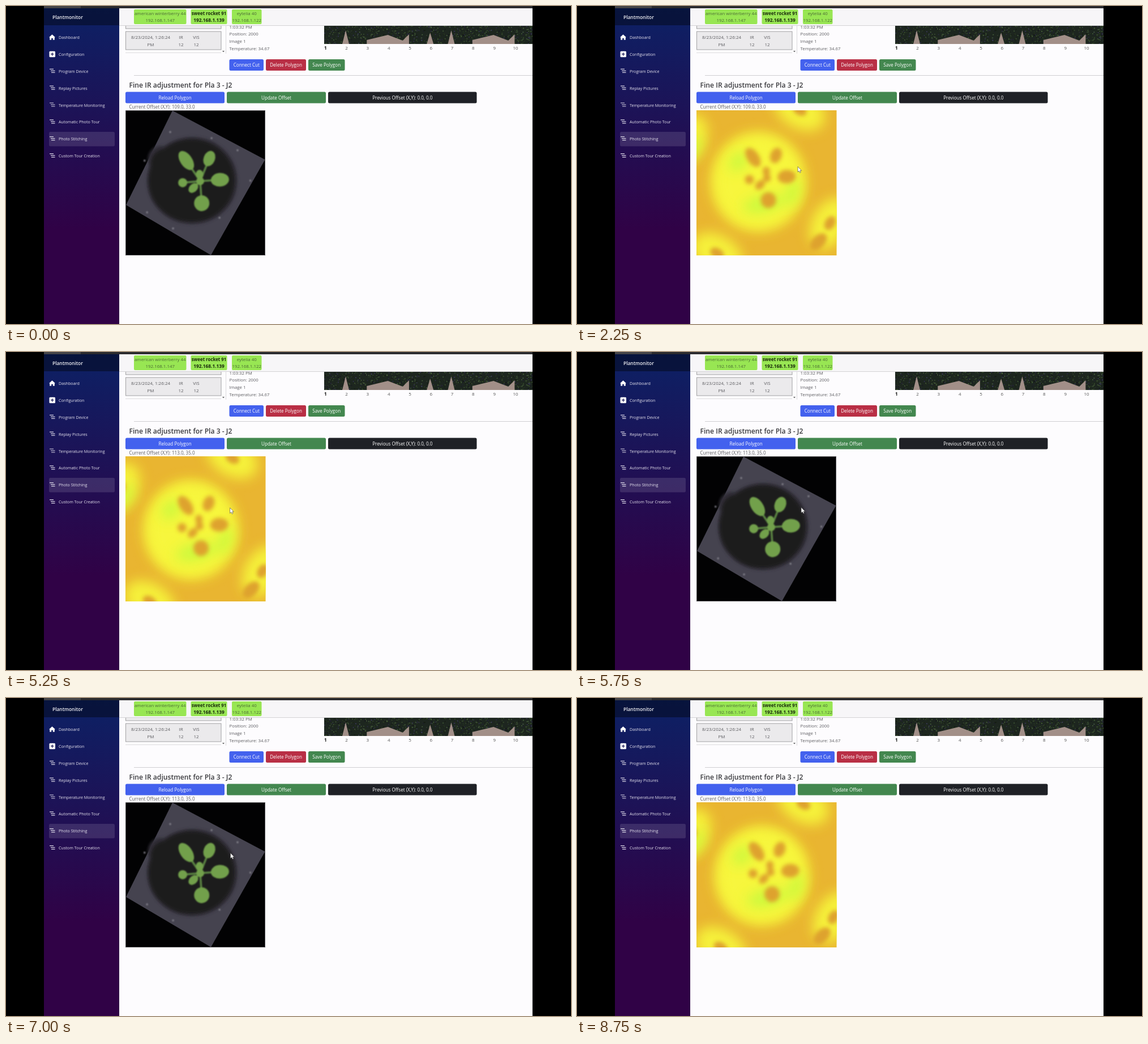
An HTML page that plays this animation: 998 px wide and 561 px high, repeating every 9.25 s.

```html
<!DOCTYPE html>
<html lang="en">
<head>
<meta charset="utf-8">
<title>Plantmonitor</title>
<style>
  html, body { margin: 0; width: 100%; height: 100%; overflow: hidden; background: #000; }
  svg { display: block; width: 998px; height: 561px; font: 8px "Open Sans", "Noto Sans", sans-serif; }
</style>
</head>
<body>
<svg id="stage" viewBox="0 0 998 561">
  <defs>
    <linearGradient id="side" x2="0" y2="1">
      <stop stop-color="#0c2165"/><stop offset=".7" stop-color="#300246"/>
    </linearGradient>
    <clipPath id="strip"><rect x="562" y="34" width="368" height="33"/></clipPath>
    <clipPath id="photo"><rect x="211" y="184" width="247.500" height="256"/></clipPath>
    <filter id="soft"><feGaussianBlur stdDeviation="0.8"/></filter>
    <filter id="rough"><feGaussianBlur stdDeviation="2.5"/></filter>
    <filter id="warm" x="-30%" y="-30%" width="160%" height="160%"><feGaussianBlur stdDeviation="3.8"/></filter>
    <filter id="heat" x="-40%" y="-40%" width="180%" height="180%"><feGaussianBlur stdDeviation="11"/></filter>
  </defs>
</svg>
<script>
const stage = document.getElementById('stage');
const GREY = '#5c5c60';

const rect = (x, y, w, h, fill, r = 0, extra = '') =>
  `<rect x="${x}" y="${y}" width="${w}" height="${h}" rx="${r}" fill="${fill}" ${extra}/>`;
const text = (x, y, str, fill, size = 8, anchor = 'start', weight = 400, id = '') =>
  `<text id="${id}" x="${x}" y="${y}" fill="${fill}" font-size="${size}" text-anchor="${anchor}" font-weight="${weight}">${str}</text>`;
const path = (d, fill, extra = '') => `<path d="${d}" fill="${fill}" ${extra}/>`;
const blur = (shapes, fill, filter) => `<g fill="${fill}" filter="url(#${filter})">${shapes}</g>`;
const button = (x, y, w, fill, label) =>
  rect(x, y, w, 20, fill, 2.5) + text(x + w / 2, y + 13, label, '#fff', 8.1, 'middle');
const repeat = (n, part) => Array.from({ length: n }, (_, i) => part(i)).join('');

// ellipse at a distance and angle from a centre, its long axis pointing outwards
const petal = (x, y, angle, dist, rx, ry = rx) =>
  `<ellipse cx="${dist}" rx="${rx}" ry="${ry}" transform="translate(${x} ${y}) rotate(${angle})"/>`;

function random(seed) {
  return () => (seed = seed * 16807 % 2147483647) / 2147483647;
}

function sidebar() {
  const items = ['Dashboard', 'Configuration', 'Program Device', 'Replay Pictures', 'Temperature Monitoring',
    'Automatic Photo Tour', 'Photo Stitching', 'Custom Tour Creation'];
  const house = y => path(`M76 ${y}l5.500-5 5.500 5h-1.200v4.500h-3v-3h-2.600v3h-3V${y}z`, '#fff');
  const plus = y => rect(76.5, y - 5.5, 10.5, 10.5, '#fff', 1.5) +
    path(`M79 ${y - .2}h5.500M81.750 ${y - 3}v5.500`, 'none', 'stroke="#20205c" stroke-width="1.300"');
  const list = y => path(`M77 ${y - 3.7}h7m-5 3h7.500m-6.500 3h6.500`, 'none', 'stroke="#d8d4e4" stroke-width="1.200"');
  return rect(67, 4, 133, 557, 'url(#side)') + rect(67, 4, 133, 30, 'rgba(0,0,0,.4)') +
    text(82, 22.7, 'Plantmonitor', '#f2f2f6', 8.4, 'start', 600) +
    rect(76, 222, 116, 25.5, 'rgba(255,255,255,.12)', 2.5) +
    items.map((name, i) => {
      const y = 55.3 + i * 29.85;
      return ([house, plus][i] || list)(y) + text(93, y + 2.8, name, '#e6e3ee', 7.15);
    }).join('');
}

function plantStrip() {
  const rnd = random(41), step = 37.3;
  const speckle = repeat(900, () => rect(562 + rnd() * 368, 34 + rnd() * 33, 2, 1.8,
    `hsl(${rnd() < .75 ? 100 : 245} 24% ${8 + rnd() * 24}%)`, 0.8));
  const wedge = (x, h) => `M${x - 6} 67L${x} ${67 - h} ${x + 6} 67z`;
  // the seams repeat every five tiles
  const seams = repeat(2, i => {
    const x = 600 + i * step * 5;
    return wedge(x, 24) + wedge(x + 4 * step, 20) +
      `M${x + step} 67V60L${x + 2 * step} 51 ${x + 2.7 * step} 61 ${x + 3 * step} 50V67z`;
  });
  const label = i => text(564.3 + i * step, 77, i + 1, i ? '#555' : '#111', 8, 'middle', i ? 400 : 700);
  return `<g clip-path="url(#strip)">${rect(562, 34, 368, 33, '#1d261f') + speckle + path(seams, '#a28f88')}</g>` +
    repeat(10, label);
}

function history() {
  const row = (y, lines) => rect(211.5, y, 168.5, 32, '#ebeaec', 0, 'stroke="#a2a2a4"') +
    lines.map((cells, i) => cells.map((s, k) =>
      text([255.5, 309, 336][k], y + 13 + i * 12.5, s, GREY, 8, 'middle')).join('')).join('');
  return row(8, [[], ['PM', '12', '12']]) +
    row(45, [['8/23/2024, 1:26:24', 'IR', 'VIS'], ['PM', '12', '12']]) +
    path('M211 82.500H380M388.500 34V84', 'none', 'stroke="#dcdbdd"') + path('M382 79h4l-2 2.500z', '#666');
}

function page() {
  return rect(200, 4, 730, 557, '#fdfcfe') + history() + plantStrip() +
    ['1:03:32 PM', 'Position: 2000', 'Image 1', 'Temperature: 34.67']
      .map((s, i) => text(394.5, 39.6 + i * 12.7, s, GREY, 7.8)).join('') +
    button(394.5, 94, 60.5, '#4361ee', 'Connect Cut') +
    button(459, 94, 71, '#b92f45', 'Delete Polygon') +
    button(534, 94, 64.5, '#43874f', 'Save Polygon') +
    rect(226, 122, 704, 1, '#cfced1') +
    text(217.5, 144.3, 'Fine IR adjustment for Pla 3 - J2', '#3a3a3e', 12.15, 'start', 600) +
    button(211, 151.5, 175, '#4361ee', 'Reload Polygon') +
    button(390, 151.5, 175, '#43874f', 'Update Offset') +
    button(569, 151.5, 262.5, '#1f2126', 'Previous Offset (X,Y): 0.0, 0.0') +
    text(217.5, 181, '', GREY, 8.05, 'start', 400, 'offset');
}

function header() {
  const tag = (x, w, name, address, weight, fill) =>
    rect(x, 6, w, 26, '#98e653', 2) +
    text(x + w / 2, 16, name, fill, 7.9, 'middle', weight) +
    text(x + w / 2, 28.4, address, fill, weight > 400 ? 8.3 : 7.9, 'middle', weight);
  return rect(67, 0, 863, 4, '#2b2b2e') + rect(67, 0, 65, 4, '#444447') +
    rect(200, 4, 730, 30, '#f7f6f8') + rect(200, 34, 730, 1, '#d3d2d5') +
    tag(226, 92.5, 'american winterberry 44', '192.168.1.147', 400, '#4b6a35') +
    tag(326.5, 64, 'sweet rocket 91', '192.168.1.139', 700, '#1a2b0c') +
    tag(399, 52.5, 'eytelia 40', '192.168.1.122', 400, '#4b6a35');
}

// leaf: angle, distance, half length, half width
const leaves = [[-124, 44, 19, 10.5], [-68, 43, 14, 10], [-4, 35, 16, 12], [175, 31, 8, 8],
  [86, 39, 14, 13.5], [135, 17, 10, 7], [-95, 12, 8, 6.5]];
const plant = (x, y) => leaves.map(leaf => petal(x, y, ...leaf)).join('') + petal(x, y, 0, 0, 7);

function visiblePhoto() {
  const x = 343, y = 309, rnd = random(7);
  const stems = leaves.map(([angle, dist]) =>
    `<path d="M0 0H${dist}" stroke="#5b8543" stroke-width="3.500" transform="translate(${x} ${y}) rotate(${angle})"/>`).join('');
  const specks = repeat(8, i => petal(329, 308, 45 * i + 30 * rnd(), 75 + 30 * rnd(), 1.7));
  return rect(211, 184, 247, 256, '#020203') +
    path('M294 184.500L457.500 271 362 439.500 212 351z', '#45434f') +
    blur(petal(329, 308, 0, 0, 80, 77) + petal(329, 308, 215, 66, 24), '#302f37', 'rough') +
    blur(petal(328, 308, 0, 0, 76, 73) + petal(328, 308, 213, 55, 26), '#1b1b1d', 'rough') +
    blur(specks, '#85848d', 'soft') +
    blur(stems + plant(x, y), '#72a04c', 'soft') +
    rect(211.5, 184.5, 246, 255, 'none', 0, 'stroke="#77767a" stroke-width=".7"');
}

function heatPhoto() {
  const x = 322, y = 310;
  // neighbouring pots sit on a tilted square grid around the middle one
  const around = (dist, rx, ry) => repeat(4, k => petal(x, y, 30 + 90 * k, dist, rx, ry));
  return rect(180, 150, 310, 320, '#e9b531') +
    blur(petal(x, y, 0, 0, 84, 88) + around(146, 32, 48), '#f5f13a', 'heat') +
    blur(petal(x, y, 0, 0, 72, 75), '#f7f63c', 'heat') +
    blur(petal(x, y, 78, 40, 14, 36) + petal(x, y, 18, 63, 11, 25) + petal(x, y, 225, 50, 13, 19) +
      petal(x, y, 207, 128, 8, 24), '#c8f93d', 'heat') +
    blur(plant(x + 15, y - 6.5) + around(146, 9, 13) + petal(x, y, 45, 150, 11, 18), '#dea22d', 'warm');
}

stage.innerHTML += page() + sidebar() + header() +
  `<g clip-path="url(#photo)"><g id="visible">${visiblePhoto()}</g><g id="heatmap">${heatPhoto()}</g></g>` +
  path('M0 0V9.500L2.200 7.600 3.700 10.800 5.300 10 3.900 7H6.700z', '#fff', 'id="cursor" stroke="#444" stroke-width=".6"');

const [offset, visible, heatmap, cursor] =
  ['offset', 'visible', 'heatmap', 'cursor'].map(id => document.getElementById(id));

const progress = (t, from, to) => Math.min(1, Math.max(0, (t - from) / (to - from)));
const easeOut = k => 1 - (1 - k) ** 2;

// enter, drift while adjusting, then leave downwards
function pointerAt(t) {
  const enter = 1 - easeOut(progress(t, 500, 1250));
  const drift = easeOut(progress(t, 1250, 7000));
  const leave = progress(t, 7000, 7500);
  return [387 + 40 * enter + 9.5 * drift + 6 * leave, 288 + 55 * enter - 14.5 * drift + 180 * leave];
}

function draw() {
  const t = Math.floor(performance.now() % 9250 / 250) * 250;
  const adjust = progress(t, 2750, 5000);
  const x = 109 + Math.floor(4 * adjust), y = 33 + Math.floor(2 * adjust);
  const heatOn = (t >= 2000 && t < 5750) || t >= 7500;
  offset.textContent = `Current Offset (X,Y): ${x}.0, ${y}.0`;
  visible.style.display = heatOn ? 'none' : '';
  heatmap.style.display = heatOn ? '' : 'none';
  heatmap.setAttribute('transform', `translate(${(x - 110) * 1.6} ${(y - 33) * 1.8})`);
  cursor.style.display = t >= 500 && t < 8000 ? '' : 'none';
  cursor.setAttribute('transform', `translate(${pointerAt(t)})`);
  requestAnimationFrame(draw);
}
draw();
</script>
</body>
</html>
```
